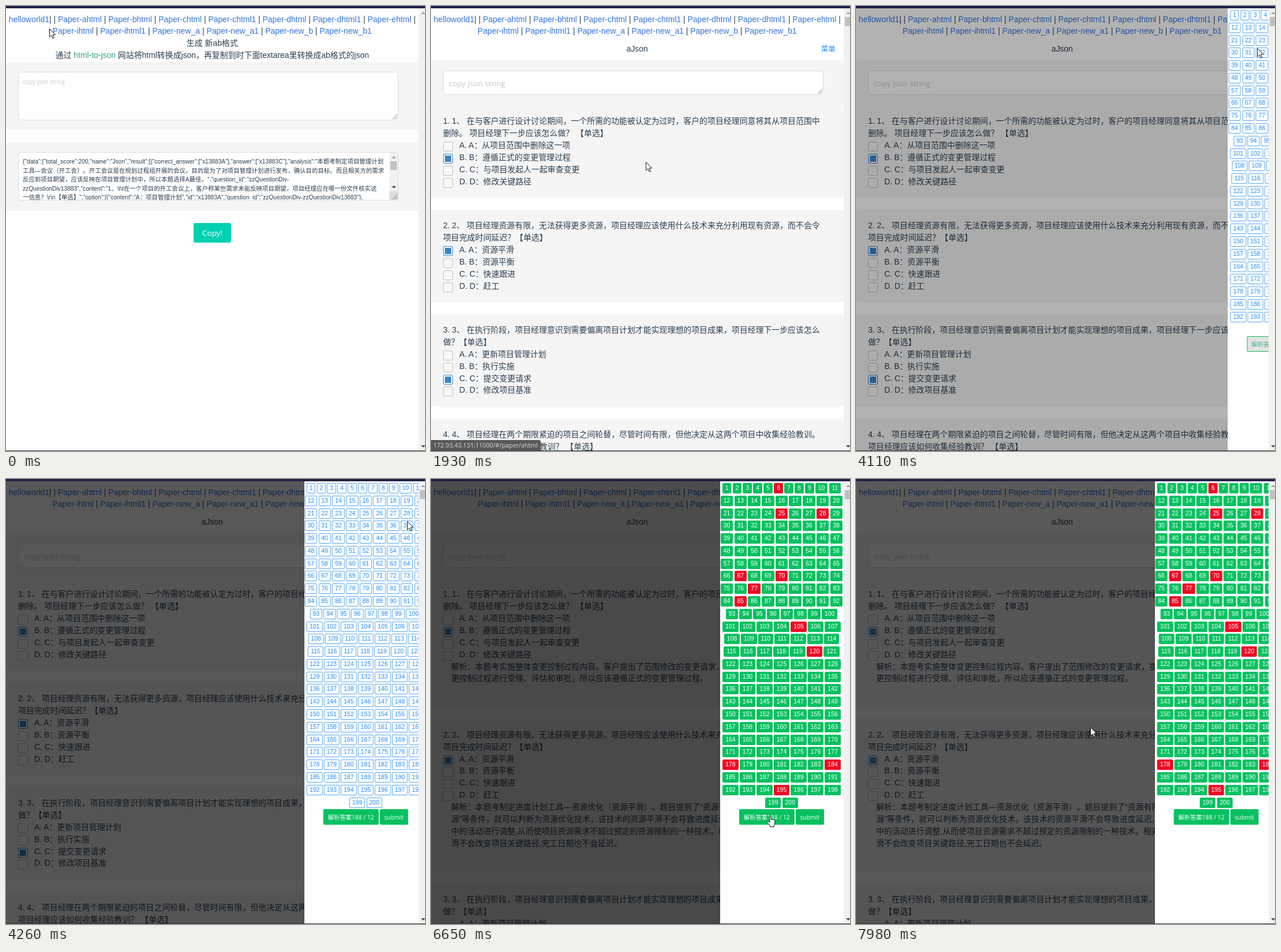
Animation, 726 px wide and 771 px high, one loop 8 s. Source, as an HTML page:

```html
<!DOCTYPE html>
<html lang="zh-CN">
<head>
<meta charset="utf-8">
<title>Paper</title>
<style>
html { font-size: 13.92px; }
html, body { margin: 0; width: 726px; height: 771px; overflow: hidden; background: #fff; }
body {
  position: relative; color: #2c3e50; line-height: 1.5; white-space: nowrap;
  font-family: "Liberation Sans", "Noto Sans CJK SC", "Noto Sans CJK", sans-serif;
  text-spacing-trim: space-all;
}
body, body * { box-sizing: border-box; }
.abs, .layer { position: absolute; }
.layer { left: 0; top: 0; width: 726px; height: 771px; overflow: hidden; }
.ui { font-family: "Open Sans", "Noto Sans CJK SC", "Noto Sans CJK", sans-serif; }
.mid { left: 0; width: 714.5px; text-align: center; }
a { color: #3273dc; }
.panel { width: 714.5px; background: #f5f5f5; border-radius: 5px; }
.area { left: 21px; width: 659px; background: #fff; border: 1px solid #dbdbdb; border-radius: 4px; overflow: hidden; }
.hint { color: #c8c8c8; }
.grip { position: absolute; right: 1px; bottom: 1px; width: 8px; height: 8px; }
.json { left: 7px; top: 8px; font-size: 10.44px; line-height: 15.6px; }
.json i { font-style: normal; font-size: 10.2px; }
.question { padding: 1.25rem 1.5rem; margin-bottom: 1.5rem; }
.option { position: relative; padding-left: 28px; }
.option::before {
  content: ""; position: absolute; left: 0; top: 4px; width: 15px; height: 15px;
  border: 1px solid #bfbfbf; border-radius: 3px; background: #f8f8f8;
}
.picked::before { border-color: #3a83c4; background: #3a86c8; box-shadow: inset 0 0 0 2px #fff; }
.why { padding-left: 14px; margin-bottom: 1.5rem; }
#clip { left: 0; top: 4px; width: 714.5px; height: 766px; overflow: hidden; }
#shade { inset: 0; background: #000; opacity: 0; }
#drawer { left: 500.5px; top: 0; width: 214px; height: 766px; background: #fff; }
.grid { left: 0; top: 1.1px; width: 214px; }
.row { display: flex; justify-content: center; align-items: center; gap: 2.1px; height: 21.79px; }
.num {
  flex: none; height: 18px; padding: 0 4px; line-height: 16px; font-size: 10.44px;
  border: 1px solid #55a5f5; border-radius: 2px; color: #1989fa; background: #fff;
}
.done .num { color: #fff; background: #07c160; border-color: #07c160; }
.done .wrong { background: #ee0a24; border-color: #ee0a24; }
.actions { left: 0; top: 567.7px; width: 214px; display: flex; justify-content: center; gap: 2px; }
.act {
  flex: none; height: 27.6px; padding: 0 7px; line-height: 26px; font-size: 10.3px;
  border: 1px solid #07c160; border-radius: 2px; background: #07c160; color: #fff;
}
#status {
  left: 0; top: 752px; width: 190px; height: 19px; padding-left: 4px; line-height: 19px;
  font-size: 10.75px; color: #d8d8d8; background: #595959; border-radius: 0 3px 0 0;
}
#bar { left: 714.5px; top: 4px; width: 11.5px; height: 766px; background: #f1f1f1; }
.tri { position: absolute; border: 4px solid transparent; border-top-width: 0; border-bottom: 4px solid #a3a3a3; }
.tri.down { border-bottom-width: 0; border-top: 4px solid #505050; }
.thumb { position: absolute; background: #c1c1c1; }
#cursor { left: 0; top: 0; width: 0; height: 0; }
#cursor svg { position: absolute; left: 0; top: 0; overflow: visible; fill: #fff; stroke: #111; }
</style>
</head>
<body>
<div class="layer" id="home">
  <div class="abs mid" style="top:54.4px">生成 新ab格式<br>通过 <span style="color:#35a27e">html-to-json</span> 网站将html转换成json，再复制到时下面textarea里转换成ab格式的json</div>
  <div class="abs panel" style="top:97px;height:118px"></div>
  <div class="abs area" style="top:114px;height:84px">
    <span class="abs ui hint" style="left:7px;top:9px;font-size:10px">copy json string</span>
    <svg class="grip"><path d="M0 8 8 0M4 8 8 4" stroke="#777"/></svg>
  </div>
  <div class="abs panel" style="top:236px;height:118.5px"></div>
  <div class="abs area" style="top:253px;height:84px">
    <div class="abs json" id="json"></div>
    <div class="abs" style="right:0;top:0;width:15px;height:67px;background:#f1f1f1">
      <i class="tri" style="left:4px;top:6px"></i>
      <i class="thumb" style="left:2px;top:15px;width:11px;height:15px"></i>
      <i class="tri down" style="left:4px;top:58px"></i>
    </div>
    <div class="abs" style="right:0;bottom:0;width:15px;height:15px;background:#dcdcdc"></div>
    <svg class="grip"><path d="M0 8 8 0M4 8 8 4" stroke="#777"/></svg>
  </div>
  <div class="abs ui" style="left:325px;top:376px;width:65px;height:34px;border-radius:3px;background:#00d1b2;color:#fff;text-align:center;line-height:34px;font-size:13.4px">Copy!</div>
</div>

<div class="layer" id="paper">
  <div class="abs mid" style="top:64.2px">aJson</div>
  <div class="abs" style="left:676px;top:66px;font-size:12.4px;color:#1989fa">菜单</div>
  <div class="abs panel" style="top:94px;height:78px"></div>
  <div class="abs area" id="input" style="top:112px;height:42px">
    <span class="abs ui hint" style="left:9px;top:11px;font-size:13.4px">copy json string</span>
    <svg class="grip"><path d="M0 8 8 0M4 8 8 4" stroke="#777"/></svg>
  </div>
  <div class="abs" id="asked" style="left:0;top:171.9px"></div>
  <div class="abs" id="solved" style="left:0;top:171.9px"></div>
</div>

<div class="abs mid" id="nav" style="top:12.6px"></div>
<div class="abs ui" id="status">172.93.43.131:11000/#/paper/ahtml</div>

<div class="abs" id="clip">
  <div class="abs" id="shade"></div>
  <div class="abs" id="drawer">
    <div class="abs grid" id="plain"></div>
    <div class="abs grid done" id="marked"></div>
    <div class="abs actions ui"><span class="act" id="check">解析答案188 / 12</span><span class="act">submit</span></div>
  </div>
</div>

<div class="abs" id="bar">
  <i class="tri" style="left:4px;top:6px"></i>
  <i class="thumb" id="thumb" style="left:2px;top:15px;width:10px;height:16px"></i>
  <i class="tri down" style="left:4px;top:757px"></i>
</div>
<div class="abs" style="left:0;top:0;width:726px;height:4px;background:#20234a"></div>
<div class="abs" style="left:0;top:770px;width:726px;height:1px;background:#33343c"></div>

<div class="abs" id="cursor">
  <svg id="arrow" width="14" height="20"><path d="M.5 .5V15l3.4-3.2 2.3 5.3 2.3-1-2.3-5.2H10.8z"/></svg>
  <svg id="hand" width="16" height="21"><path transform="translate(-6.7)" d="M5.5 1.8c0-1.6 2.4-1.6 2.4 0v5.4c0-1.2 2.2-1.2 2.2 .2 0-1.2 2.2-1 2.2 .4 0-1 2.2-.8 2.2 .6V13c0 3-1.6 3.5-1.6 6.5H6.5C6.5 17 2.5 14 .9 11.3c-.8-1.5 1-2.2 2-1.2L5.5 12.3z"/></svg>
  <svg id="beam" width="8" height="18"><path fill="none" d="M-3 -8H3M0 -8V8M-3 8H3"/></svg>
</div>

<script>
const LOOP = 8000;
const $ = id => document.getElementById(id);

// Navigation
const link = s => `<a>Paper-${s}</a>`;
const join = s => s.split(' ').map(link).join(' | ');
$('nav').innerHTML = '<a>helloworld1</a>| | ' + join('ahtml bhtml chtml chtml1 dhtml dhtml1 ehtml') +
  ' |<br>' + join('ihtml ihtml1 new_a new_a1 new_b new_b1');

// Converted text
const json = String.raw`{"data":{"total_score":200,"name":"Json","result":[{"correct_answer":["x13883A"],"answer":["x13883C"],"analysis":"本题考制定项目管理计划
工具—会议（开工会）。开工会议是在规划过程组开展的会议，目的是为了对项目管理计划进行发布，确认目的目标。而且相关方的需求
反应到项目期望，应该反映在项目管理计划中，所以本题选择A最佳。","question_id":"zzQuestionDiv-
zzQuestionDiv13883","content":"1、\t\t在一个项目的开工会议上，客户称某些需求未能反映项目期望，项目经理应在哪一份文件核实这
一信息？\r\n【单选】","option":[{"content":"A：项目管理计划","id":"x13883A","question_id":"zzQuestionDiv-zzQuestionDiv13883"},`;
$('json').innerHTML = json.replace(/[ -~]+/g, '<i>$&</i>').replace(/\n/g, '<br>');

// Questions
const questions = [
  { text: '在与客户进行设计讨论期间，一个所需的功能被认定为过时，客户的项目经理同意将其从项目范围中<br>删除。 项目经理下一步应该怎么做？ 【单选】',
    options: ['从项目范围中删除这一项', '遵循正式的变更管理过程', '与项目发起人一起审查变更', '修改关键路径'], pick: 1,
    why: '解析：本题考实施整体变更控制过程内容。客户提出了范围修改的变更请求，变更请求<br>更控制过程进行受理、评估和审批，所以应该遵循正式的变更管理过程。' },
  { text: '项目经理资源有限，无法获得更多资源，项目经理应该使用什么技术来充分利用现有资源，而不会令<br>项目完成时间延迟？【单选】',
    options: ['资源平滑', '资源平衡', '快速跟进', '赶工'], pick: 0,
    why: '解析：本题考制定进度计划工具—资源优化（资源平滑）。题目提到了“资源有限<br>源”等条件，就可以判断为资源优化技术，该技术的资源平滑不会导致进度延迟,<br>中的活动进行调整,从而使项目资源需求不超过预定的资源限制的一种技术。相对<br>滑不会改变项目关键路径,完工日期也不会延迟。' },
  { text: '在执行阶段，项目经理意识到需要偏离项目计划才能实现理想的项目成果，项目经理下一步应该怎么<br>做？【单选】',
    options: ['更新项目管理计划', '执行实施', '提交变更请求', '修改项目基准'], pick: 2, why: '' },
  { text: '项目经理在两个期限紧迫的项目之间轮替，尽管时间有限，但他决定从这两个项目中收集经验教训。<br>项目经理应该如何收集经验教训？ 【单选】',
    options: [], why: '' }
];
const list = solved => questions.map((q, i) => `<div class="panel question">${i + 1}. ${i + 1}、 ${q.text}` +
  q.options.map((o, k) => `<div class="option${k === q.pick ? ' picked' : ''}">${'ABCD'[k]}. ${'ABCD'[k]}：${o}</div>`).join('') +
  (solved ? `<div class="why">${q.why}</div>` : '') + '</div>').join('');
$('asked').innerHTML = list(false);
$('solved').innerHTML = list(true);

// Answer sheet
const wrong = [6, 25, 28, 67, 70, 77, 85, 105, 120, 178, 184, 195];
const rows = [11, ...Array(9).fill(9), 8, ...Array(14).fill(7), 2];
let n = 0;
const grid = rows.map(size => '<div class="row">' + Array.from({ length: size }, () =>
  `<span class="num${wrong.includes(++n) ? ' wrong' : ''}">${n}</span>`).join('') + '</div>').join('');
$('plain').innerHTML = $('marked').innerHTML = grid;

// Timeline: steps are [ms, value, easing]
const start = document.timeline.currentTime || 0;
function play(id, prop, steps, easing = 'linear') {
  const all = [...steps];
  if (all[0][0] > 0) all.unshift([0, all[0][1]]);
  if (all.at(-1)[0] < LOOP) all.push([LOOP, all.at(-1)[1]]);
  const frames = all.map(([t, v, e]) => ({ offset: t / LOOP, [prop]: v, easing: e || easing }));
  $(id).animate(frames, { duration: LOOP, iterations: Infinity }).startTime = start;
}
function show(id, ...ranges) {
  const steps = ranges.flatMap(([from, to]) => to < LOOP ? [[from, 1], [to, 0]] : [[from, 1]]);
  if (steps[0][0] > 0) steps.unshift([0, 0]);
  play(id, 'opacity', steps, 'step-end');
}

const LOADED = 1530, SOLVED = 6650;
show('home', [0, 1150]);
show('paper', [1150, LOOP]);
show('asked', [LOADED, SOLVED]);
show('solved', [SOLVED, LOOP]);
show('thumb', [LOADED, LOOP]);
show('plain', [0, SOLVED]);
show('marked', [SOLVED, LOOP]);
show('status', [220, 2230]);

const OPEN = 4040, OPENED = 4370, CLOSE = 7953, SLIDE = 214;
const shift = x => `translateX(${x}px)`;
play('drawer', 'transform', [
  [0, shift(SLIDE)], [OPEN, shift(SLIDE), 'ease'], [OPENED, shift(0)],
  [CLOSE, shift(0)], [LOOP, shift(SLIDE * .13)]
]);
play('shade', 'opacity', [
  [0, 0], [OPEN - 20, 0, 'ease'], [OPENED, .7], [CLOSE, .7], [LOOP, .62]
]);
play('check', 'backgroundColor', [[0, '#e2e4e3'], [4190, '#07c160'], [6030, '#06ae56'], [SOLVED, '#07c160']], 'step-end');
play('check', 'color', [[0, '#4fae86'], [4190, '#fff']], 'step-end');
play('input', 'borderColor', [[0, '#dbdbdb'], [2330, '#b5b5b5'], [2530, '#dbdbdb']], 'step-end');

const path = [
  [0, 75, 39], [70, 75, 39], [300, 100, 36], [680, 138, 22], [910, 138, 22], [980, 133, 12],
  [1140, 133, 12], [1150, 135, 17], [1530, 135, 17], [1700, 240, 130], [1930, 372, 270],
  [2080, 374, 262], [2310, 366, 156], [2450, 352, 125], [2620, 333, 73], [2850, 333, 72],
  [2920, 421, 64], [3090, 425, 64], [3320, 643, 70], [3400, 670, 72], [3630, 694, 66],
  [3780, 694, 64], [3930, 695, 73], [4300, 695, 73], [4500, 650, 330], [4710, 598, 614],
  [4790, 597, 612], [5250, 588, 582], [5400, 588, 580], [5630, 588, 583], [7040, 588, 583],
  [7250, 510, 510], [7480, 400, 425], [7650, 368, 408], [7800, 406, 430], [8000, 406, 430]
];
play('cursor', 'transform', path.map(([t, x, y]) => [t, `translate(${x}px,${y}px)`]));
show('arrow', [0, 220], [1150, 2330], [2530, 3560], [3930, 4960], [7120, LOOP]);
show('hand', [220, 1150], [3560, 3930], [4960, 7120]);
show('beam', [2330, 2530]);
</script>
</body>
</html>
```
